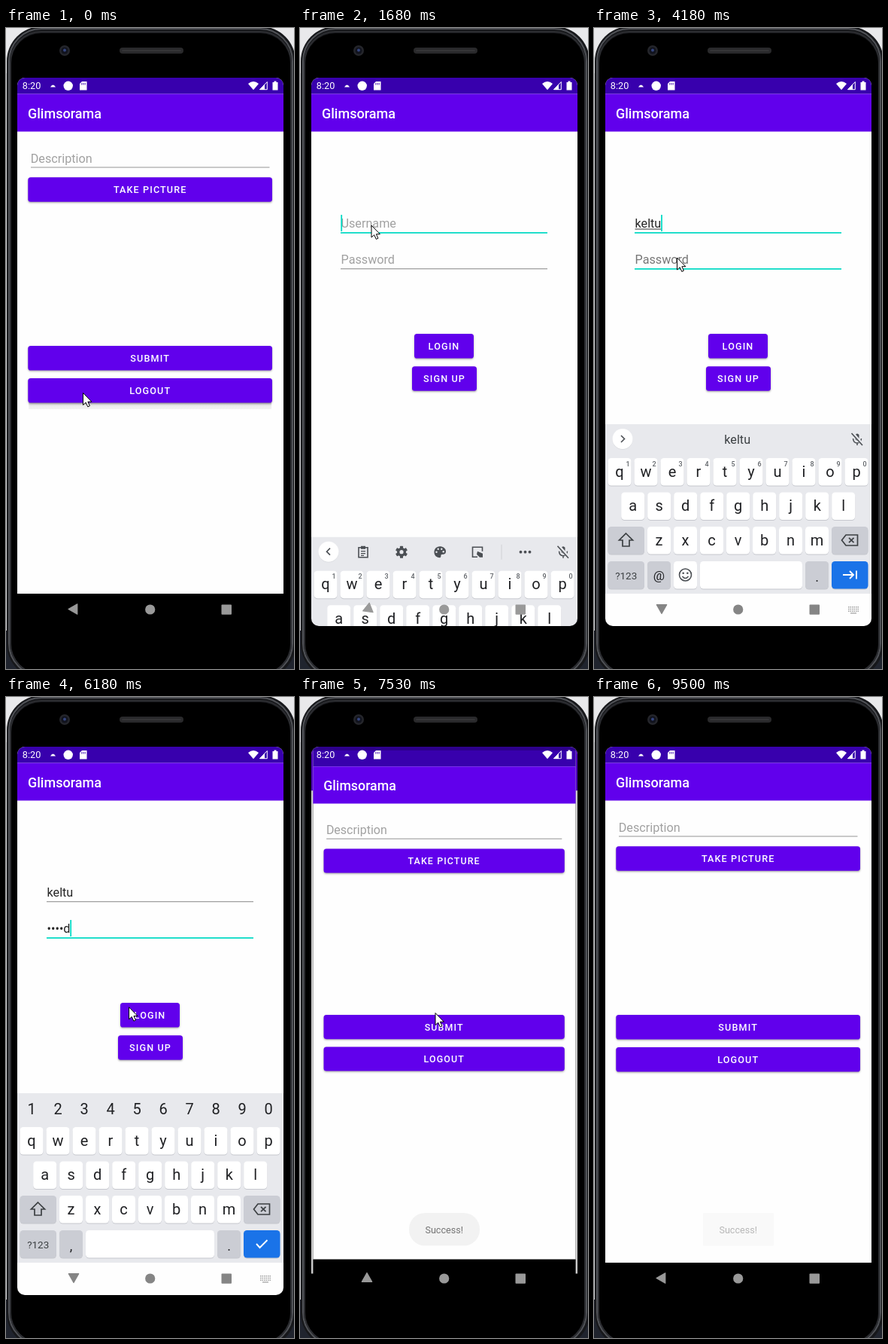
Write an HTML page with a canvas that moves like this. It is 383 px wide and 851 px high and loops after 9600 ms.

```html
<!DOCTYPE html>
<html lang="en">
<head>
<meta charset="utf-8">
<title>Login demo</title>
<style>
html, body { margin: 0; width: 100%; height: 100%; overflow: hidden; background: #fff; }
canvas { display: block; width: 383px; height: 851px; }
</style>
</head>
<body>
<canvas id="stage"></canvas>
<script>
const W = 383, H = 851, LOOP = 9600;
const APP = 'Glimsorama', USER = 'keltu';
const PURPLE = '#6100ec', DEEP = '#3800ad', TEAL = '#03dac5', PAPER = '#fefefe', INK = '#202124', ICON = '#4b4f54';
const canvas = document.getElementById('stage');
const ctx = canvas.getContext('2d');
const dpr = window.devicePixelRatio || 1;
canvas.width = W * dpr;
canvas.height = H * dpr;

const BURSTS = [
  [270, 1300, 9], [1420, 2400, 8], [2520, 2670, 2], [2950, 3200, 2], [3480, 3900, 4],
  [4180, 4420, 3], [4710, 5250, 4], [5620, 5620, 1], [5930, 6320, 4], [6600, 7530, 7],
  [7650, 8620, 7], [8740, 8860, 2], [9230, 9500, 3]
];
const MOUSE = [
  [0, 102.5, 484.5], [300, 102.5, 484.5], [900, 95.5, 279.5], [1300, 95, 262],
  [3400, 95, 262], [3900, 110.5, 305], [5850, 110.5, 305], [6185, 163, 411.5],
  [6320, 178, 419.5], [7530, 180, 419.5], [7900, 180, 419.5], [8620, 293, 811], [8740, 293, 833], [8860, 293, 870]
];
const TYPED = [[2260, 1], [2400, 2], [2520, 3], [2950, 4], [3200, 5]];
const SECRET = [[4710, 'w'], [4890, '•o'], [5070, '•••l'], [5250, '••••d']];

const clamp = x => Math.max(0, Math.min(1, x));
const ramp = (t, a, b) => clamp((t - a) / (b - a));
const easeOut = p => 1 - (1 - p) ** 3;
const last = (list, t, none) => list.reduce((v, [at, x]) => t >= at - 1 ? x : v, none);

function snap(t) {
  let s = 0;
  for (const [a, b, n] of BURSTS)
    for (let i = 0; i < n; i++) {
      const x = a + (b - a) * i / Math.max(1, n - 1);
      if (x <= t + 15) s = x;
    }
  return s;
}

function rect(x, y, w, h, fill, r = 0) {
  ctx.fillStyle = fill;
  ctx.beginPath();
  ctx.roundRect(x, y, w, h, r);
  ctx.fill();
}

function disc(x, y, r, fill) {
  ctx.fillStyle = fill;
  ctx.beginPath();
  ctx.arc(x, y, r, 0, 7);
  ctx.fill();
}

function path(d, fill, stroke, width = 1.6) {
  const p = new Path2D(d);
  if (fill) { ctx.fillStyle = fill; ctx.fill(p); }
  if (stroke) { ctx.strokeStyle = stroke; ctx.lineWidth = width; ctx.stroke(p); }
}

function text(s, x, y, size, color, align = 'left', weight = 400, spacing = 0) {
  ctx.font = `${weight} ${size}px Roboto, sans-serif`;
  ctx.letterSpacing = spacing + 'px';
  ctx.textAlign = align;
  ctx.fillStyle = color;
  ctx.fillText(s, x, y);
}

function at(x, y, draw) {
  ctx.save();
  ctx.translate(x, y);
  draw();
  ctx.restore();
}

function drawPhone() {
  rect(0, 0, W, 425, '#e9e9eb');
  rect(0, 425, W, 426, '#20242e');
  rect(0, 60, 1, 740, '#d3d4d8');
  rect(1, -2, 384, 866, '#17181b', 46);
  ctx.strokeStyle = '#515358';
  ctx.lineWidth = 2;
  ctx.beginPath();
  ctx.roundRect(4, 1, 377, 859, 43);
  ctx.stroke();
  ctx.strokeStyle = '#2c2d31';
  ctx.beginPath();
  ctx.roundRect(6, 5, 373, 853, 41);
  ctx.stroke();
  rect(7, 7, 371, 850, '#000', 40);
  rect(151, 26, 85, 8, '#29292b', 4);
  rect(154, 29, 79, 2, '#353537', 1);
  disc(78, 30, 7, '#25262b');
  disc(78, 30, 4.5, '#11131d');
  disc(78, 29.5, 2, '#34457d');
}

function button(label, x, y, w, h = 32.5, pressed = false) {
  if (pressed) {
    const g = ctx.createLinearGradient(0, y + h, 0, y + h + 9);
    g.addColorStop(0, '#cfcfcf');
    g.addColorStop(0.45, '#ececec');
    g.addColorStop(1, '#f3f3f3');
    rect(x + 1, y + h - 1, w - 2, 9.5, g);
  }
  ctx.save();
  ctx.shadowColor = 'rgba(0,0,0,.35)';
  ctx.shadowBlur = 2.5 * dpr;
  ctx.shadowOffsetY = 1.2 * dpr;
  rect(x, y, w, h, PURPLE, 3.6);
  ctx.restore();
  text(label, x + w / 2, y + h / 2 + 4.6, 12.6, '#fff', 'center', 500, 1.125);
}

function drawFrame() {
  rect(15, 66, 354, 728, '#000');
  rect(15, 66, 354, 685, PAPER);
  rect(15, 66, 354, 21.5, DEEP);
  rect(15, 87.5, 354, 50, PURPLE);
  text(APP, 29, 120, 18, '#fff', 'left', 500);
}

function drawMain(t) {
  drawFrame();
  text('Description', 32.7, 178.6, 16.2, '#a1a1a1');
  rect(33, 184.5, 317.5, 1, '#959595');
  button('TAKE PICTURE', 29.3, 198.3, 324.7);
  button('SUBMIT', 29.3, 422, 324.7);
  button('LOGOUT', 29.3, 465, 324.7, 32.5, t < 600);
}

function field(y, hint, value, o) {
  const shown = value || hint;
  text(shown, 54.5, y, 16.2, value ? '#252525' : o.dark ? '#777' : '#a1a1a1');
  const w = value ? ctx.measureText(value).width : 0;
  if (o.composing && value) rect(54.5, y + 1.6, w, 1, '#333');
  rect(54, y + (o.focus ? 6 : 6.2), 275, o.focus ? 1.8 : 1, o.focus ? TEAL : '#858585');
  if (o.caret) rect(54.3 + w, y - 17, 1.8, 22, TEAL);
}

function caretOn(t) {
  if (t < 1415) return false;
  const start = t < 2250 ? 1420 : t < 3190 ? t : t < 4290 ? 3170 : t < 5245 ? t : 5120;
  return (t - start) % 1000 < 500;
}

function drawLogin(t) {
  drawFrame();
  const onPass = t >= 4295, user = USER.slice(0, last(TYPED, t, 0));
  field(265, 'Username', user, { focus: t > 1415 && !onPass, composing: !onPass, caret: !onPass && caretOn(t) });
  field(313, 'Password', last(SECRET, t, ''), { focus: t >= 4175, dark: t >= 4175, caret: onPass && caretOn(t) });
  const press = t > 6595 && t < 6950;
  button('LOGIN', 152, 406, 79, 32.5, press);
  if (press) rect(152, 406, 79, 32.5, 'rgba(255,255,255,.15)', 3.6);
  button('SIGN UP', 149, 449.3, 86);
}

function scaled(k, alpha, draw) {
  ctx.save();
  ctx.globalAlpha = alpha;
  ctx.translate(192, 430);
  ctx.scale(k, k);
  ctx.translate(-192, -430);
  draw();
  ctx.restore();
}

// The old window grows and dims while the new one fades and scales in
function swap(t, start, from, to) {
  const p = ramp(t, start, start + 400), e = easeOut(p), a = clamp(p * 4);
  if (p === 0) return from(t);
  if (p === 1) return to(t);
  scaled(1 + 0.05 * e, 1, () => from(t));
  rect(15, 66, 354, 728, `rgba(0,0,0,${0.2 * a})`);
  scaled(0.85 + 0.15 * e, a, () => to(t));
}

function key(x, y, w, fill = '#fff') {
  rect(x, y + 1, w, 36.5, '#c6c8ce', 4.5);
  rect(x, y, w, 36.5, fill, 4.5);
}

function letters(row, x, y) {
  [...row].forEach((c, i) => {
    key(x + 35 * i - 15.5, y, 31);
    text(c, x + 35 * i, y + 24.5, 20, INK, 'center');
  });
}

function micOff() {
  at(350, 546, () => {
    path('M-2.5 -6Q0 -9 2.5 -6V0Q0 3 -2.5 0Z', ICON);
    path('M-5.5 -1Q-5 5 0 5Q5 5 5.5 -1M0 5V8', null, ICON, 1.5);
    path('M-6 -8L8 8', null, '#e8e9ed', 4);
    path('M-7.5 -8L7 8', null, ICON, 1.6);
  });
}

function toolbar() {
  at(84, 546, () => {
    path('M-6 -6H6V7H-6Z', null, ICON);
    path('M-3 -8H3V-4H-3Z', ICON);
    path('M-3 -1H3M-3 2H3M-3 4.7H1', null, ICON, 1.2);
  });
  at(135, 546, () => {
    for (let i = 0; i < 6; i++) {
      ctx.rotate(Math.PI / 3);
      rect(-2, -8, 4, 5, ICON, 0.5);
    }
    disc(0, 0, 6, ICON);
    disc(0, 0, 2.6, '#e8e9ed');
  });
  at(186, 546, () => {
    path('M0 -7.5C-10 -7.5 -10 7.5 0 7.5C2 7.5 1 4 2 3.4C4 2.5 8 4 8 -1C8 -5 4 -7.5 0 -7.5Z', ICON);
    for (const [x, y] of [[-4.5, 0], [-2.3, -4], [2.3, -4], [4.7, -.5]]) disc(x, y, 1.2, '#e8e9ed');
  });
  at(236, 546, () => {
    path('M6.5 -1V-6.5H-6.5V6.5H0', null, ICON);
    path('M0 -1L7 2V7H3L-1 3Z', ICON);
  });
  rect(267.5, 536, 1, 20, '#cfd1d6');
  for (const x of [293.5, 299.5, 305.5]) disc(x, 546, 1.9, ICON);
}

function drawKeyboard(t) {
  const secret = t >= 4415, suggest = t >= 2515;
  rect(15, 526, 354, 225, '#e8e9ed');
  rect(15, 751, 354, 43, PAPER);
  if (secret) {
    [...'1234567890'].forEach((c, i) => text(c, 34 + 35 * i, 553.5, 20, INK, 'center'));
  } else {
    disc(38, 546.2, 13.5, '#d7d9dd');
    disc(38, 545.5, 13.5, '#fff');
    at(38, 545.5, () => path(suggest ? 'M-2 -4.5L2.5 0L-2 4.5' : 'M2 -4.5L-2.5 0L2 4.5', null, ICON));
    if (!suggest) toolbar();
    else if (t < 4295) text(USER.slice(0, last(TYPED, t, 0)), 190.7, 552, 16.2, '#3c4043', 'center');
    micOff();
  }
  letters('qwertyuiop', 34, 571);
  if (!secret) [...'1234567890'].forEach((c, i) => text(c, 45 + 35 * i, 581.5, 9, '#5f6368', 'center', 500));
  letters('asdfghjkl', 51.7, 616.5);
  letters('zxcvbnm', 86.5, 662);

  const grey = '#cbcdd4';
  key(18.5, 662, 48.5, grey);
  at(42.5, 680, () => path('M0 -9L9 0H4.5V8H-4.5V0H-9Z', null, '#3c4043', 1.7));
  key(316, 662, 48.5, grey);
  at(340.5, 680, () => path('M-11 0L-5.5 -7H10V7H-5.5ZM-1.5 -3.2L5 3.2M5 -3.2L-1.5 3.2', null, '#3c4043', 1.7));
  key(18.5, 708, 48.5, grey);
  text('?123', 42.7, 731.5, 13.5, '#3c4043', 'center');
  key(71, 708, 31, grey);
  text(secret ? ',' : '@', 86.5, secret ? 734.5 : 733, secret ? 18 : 17, INK, 'center');
  if (secret) key(106, 708, 171);
  else {
    key(106, 708, 31);
    at(121.5, 726, () => {
      path('M8 0A8 8 0 1 1 -8 0A8 8 0 1 1 8 0M-4 2Q0 7 4 2', null, ICON, 1.6);
      disc(-2.8, -2.3, 1.3, ICON);
      disc(2.8, -2.3, 1.3, ICON);
    });
    key(141, 708, 136);
  }
  key(281, 708, 31, grey);
  text('.', 296.5, 734.5, 18, INK, 'center');
  key(316, 708, 48.5, '#1a73e8');
  at(340, 726, () => path(secret ? 'M-7 0L-2.5 5L7.5 -5' : 'M-9 0H5M0 -5L5 0L0 5M9 -5.5V5.5', null, '#fff', 1.9));
}

function drawNav(t, kb) {
  const color = kb > 0.5 ? '#858585' : '#999';
  const turn = t < 3000 ? -90 * ramp(t, 1500, 1750) : 270 * (1 - ramp(t, 7300, 7645));
  at(89.5, 771, () => {
    ctx.rotate(turn * Math.PI / 180);
    ctx.lineJoin = 'round';
    path('M-6.5 .5L5.3 -6.2V7.2Z', color, color, 1.2);
  });
  disc(191.7, 772, 6.6, color);
  rect(286.5, 765.5, 13.5, 13.3, color, 1);
  if (kb > 0.5) {
    for (let r = 0; r < 3; r++)
      for (let c = 0; c < 6; c++) rect(338 + c * 2.5, 768 + r * 2.7, 1.5, 1.6, '#a0a0a0');
    rect(341, 776.2, 8, 1.4, '#a0a0a0');
  }
}

function drawStatus() {
  text('8:20', 21.8, 81.3, 12.7, '#fff');
  path('M59 78.5Q62.5 72.5 66 78.5Z', '#fff');
  disc(82.7, 76.8, 6.2, '#fff');
  path('M101 71H107.5V82.5H98V74Z', '#fff');
  path('M100.8 73V75.5M103 73V75.5M105.2 73V75.5', null, DEEP, 0.9);
  path('M322 74Q329 68 336 74L329 82.3Z', '#fff');
  path('M347.3 71.5V81.7H337.5Z', null, '#fff', 1);
  path('M344 74.5V82H337Z', '#fff');
  path('M356.5 70.5H359.5V72H361.5V82.5H354.5V72H356.5Z', '#fff');
}

function drawToast(t) {
  if (t < 7300) return;
  const a = t < 9200 ? ramp(t, 7300, 7683) : 1 - 0.7 * ramp(t, 9122, 9500);
  ctx.save();
  ctx.globalAlpha = a;
  rect(145, 685, 94, 43.5, '#ebebeb', t < 9490 ? 21 : 1);
  text('Success!', 191.7, 711.6, 12.6, '#222', 'center');
  ctx.restore();
}

function drawMouse(t) {
  if (t >= 8855) return;
  const i = MOUSE.findIndex(m => m[0] > t);
  const [a, x, y] = MOUSE[i - 1], [b, u, v] = MOUSE[i];
  const p = ramp(t, a, b);
  at(x + (u - x) * p, y + (v - y) * p, () =>
    path('M0 0V16L3.7 12.7L6.3 18.4L8.9 17.2L6.4 11.7H11.4Z', '#fff', '#000', 1));
}

function draw(now) {
  const t = snap(now % LOOP);
  ctx.setTransform(dpr, 0, 0, dpr, 0, 0);
  drawPhone();
  ctx.save();
  ctx.beginPath();
  ctx.roundRect(15, 66, 354, 728, 10);
  ctx.clip();
  if (t < 3000) swap(t, 300, drawMain, drawLogin);
  else swap(t, 7310, drawLogin, drawMain);
  const kb = easeOut(ramp(t, 1500, 1840)) * (1 - ramp(t, 7220, 7450));
  if (kb > 0) at(0, (1 - kb) * 268, () => drawKeyboard(t));
  drawNav(t, kb);
  drawToast(t);
  drawStatus();
  ctx.restore();
  drawMouse(t);
}

const begin = performance.now();
function tick() {
  draw(performance.now() - begin);
  requestAnimationFrame(tick);
}
tick();
</script>
</body>
</html>
```
